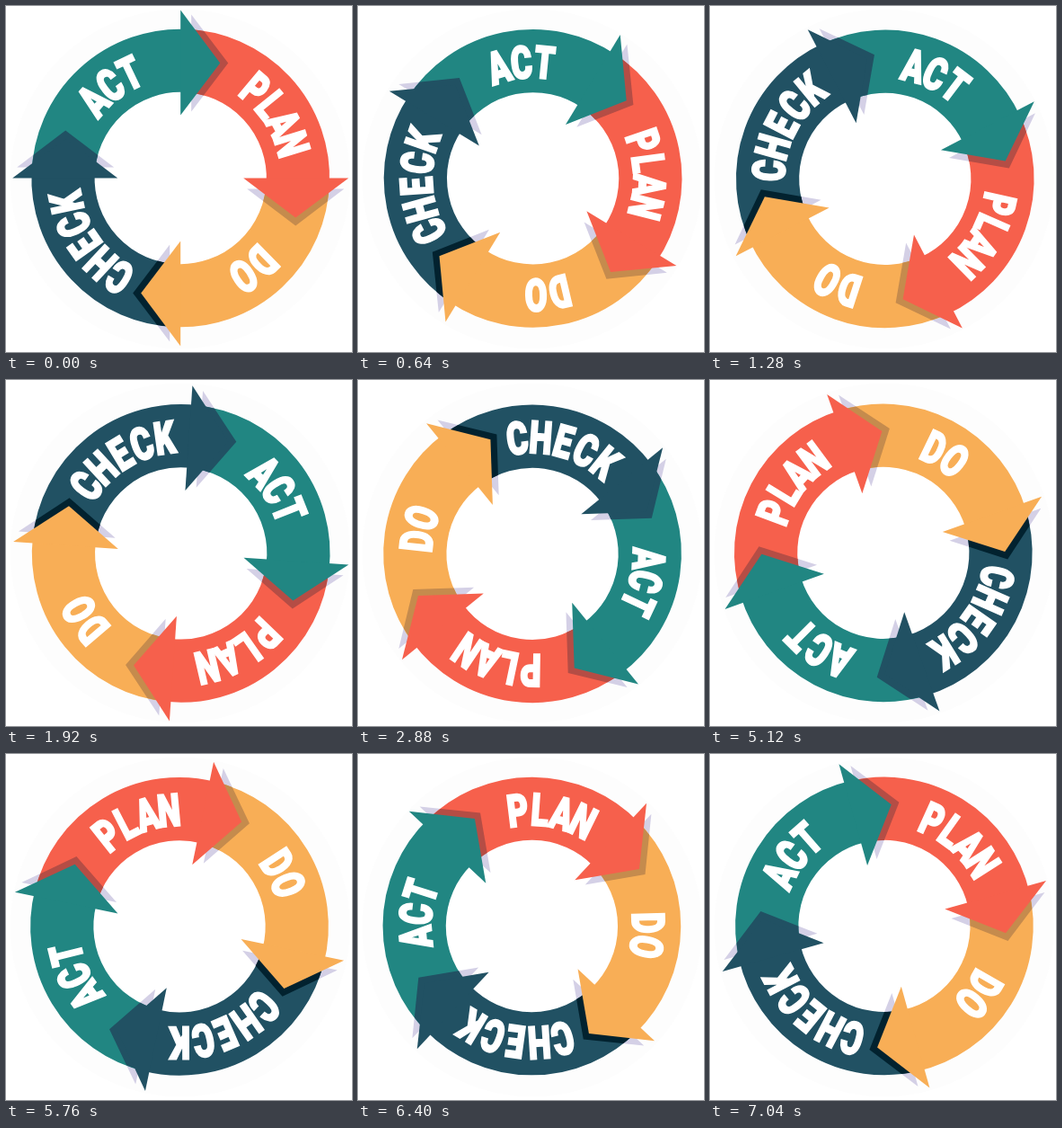
Write an HTML page that moves like this. It is 385 by 385 pixels and loops after 7.36 s.

```html
<!DOCTYPE html>
<html lang="en">
<head>
<meta charset="utf-8">
<title>PDCA cycle</title>
<style>
  html, body { margin: 0; width: 100%; height: 100%; overflow: hidden; background: #fff; }
  svg { display: block; width: 100vw; height: 100vh; }
  text { font: 900 50px Roboto, Inter, sans-serif; fill: #fff; stroke: #fff; stroke-width: 2.4; text-anchor: middle; }
</style>
</head>
<body>
<svg viewBox="-193.8 -192.4 385 385">
  <defs>
    <clipPath id="band">
      <path clip-rule="evenodd" d="M-165.7 0a165.7 165.7 0 1 0 331.4 0a165.7 165.7 0 1 0-331.4 0zM-95.5 0a95.5 95.5 0 1 0 191 0a95.5 95.5 0 1 0-191 0z"/>
    </clipPath>
  </defs>
  <circle r="189" fill="#fdfdfd"/>
  <circle r="100" fill="#fff"/>
  <g id="spin"><g id="wheel" transform="translate(.4 -.9)"></g></g>
</svg>
<script>
const STEP = 320, STEPS = 23;
const INNER = 95.5, OUTER = 165.7, BASELINE = 112, CONDENSE = 0.72;

// turn: where the arrow head sits; mid and pitch: label angles; shade: head shadow on the next arc
const parts = [
  { label: 'ACT',   turn: 0,   color: '#218682', shade: '#b54d45', mid: -37,   pitch: 11.4 },
  { label: 'PLAN',  turn: 90,  color: '#f6604c', shade: '#c58b4d', mid: 56.5,  pitch: 11 },
  { label: 'DO',    turn: 180, color: '#f8ae56', shade: '#02222f', mid: 141.3, pitch: 11.8 },
  { label: 'CHECK', turn: 270, color: '#215163', shade: '#215163', mid: 234.8, pitch: 11.6 }
];

const HEAD = 'M0-187L44-128L0-70Z';
const SHADOW = 'M12-182L53-128L12-74Z';
const spin = document.getElementById('spin');
const wheel = document.getElementById('wheel');

function add(parent, tag, attrs) {
  const el = document.createElementNS('http://www.w3.org/2000/svg', tag);
  for (const key in attrs) el.setAttribute(key, attrs[key]);
  return parent.appendChild(el);
}

const shape = (parent, d, fill, turn) =>
  add(parent, 'path', { d, fill, transform: `rotate(${turn})` });

// Each arc ends slightly past the next one's start, so the joint hides under the head.
function arc(part) {
  const r = (INNER + OUTER) / 2;
  add(wheel, 'path', {
    d: `M4 ${-r}A${r} ${r} 0 0 1 ${r} 6`,
    fill: 'none', stroke: part.color, 'stroke-width': OUTER - INNER,
    transform: `rotate(${part.turn - 90})`
  });
}

function label({ label, mid, pitch }) {
  [...label].forEach((char, i) => {
    const angle = mid + (i - (label.length - 1) / 2) * pitch;
    add(wheel, 'text', {
      transform: `rotate(${angle}) translate(0 ${-BASELINE}) scale(${CONDENSE} 1)`
    }).textContent = char;
  });
}

parts.forEach(p => shape(wheel, SHADOW, '#d4d0e6', p.turn));
parts.forEach(arc);
const shades = add(wheel, 'g', { 'clip-path': 'url(#band)' });
parts.forEach(p => shape(shades, SHADOW, p.shade, p.turn));
parts.forEach(p => shape(wheel, HEAD, p.color, p.turn));
parts.forEach(label);

const start = performance.now();
function draw(now) {
  const step = Math.floor(Math.max(0, now - start) / STEP) % STEPS;
  spin.setAttribute('transform', `rotate(${step * 360 / STEPS})`);
  requestAnimationFrame(draw);
}
draw(start);
</script>
</body>
</html>
```
